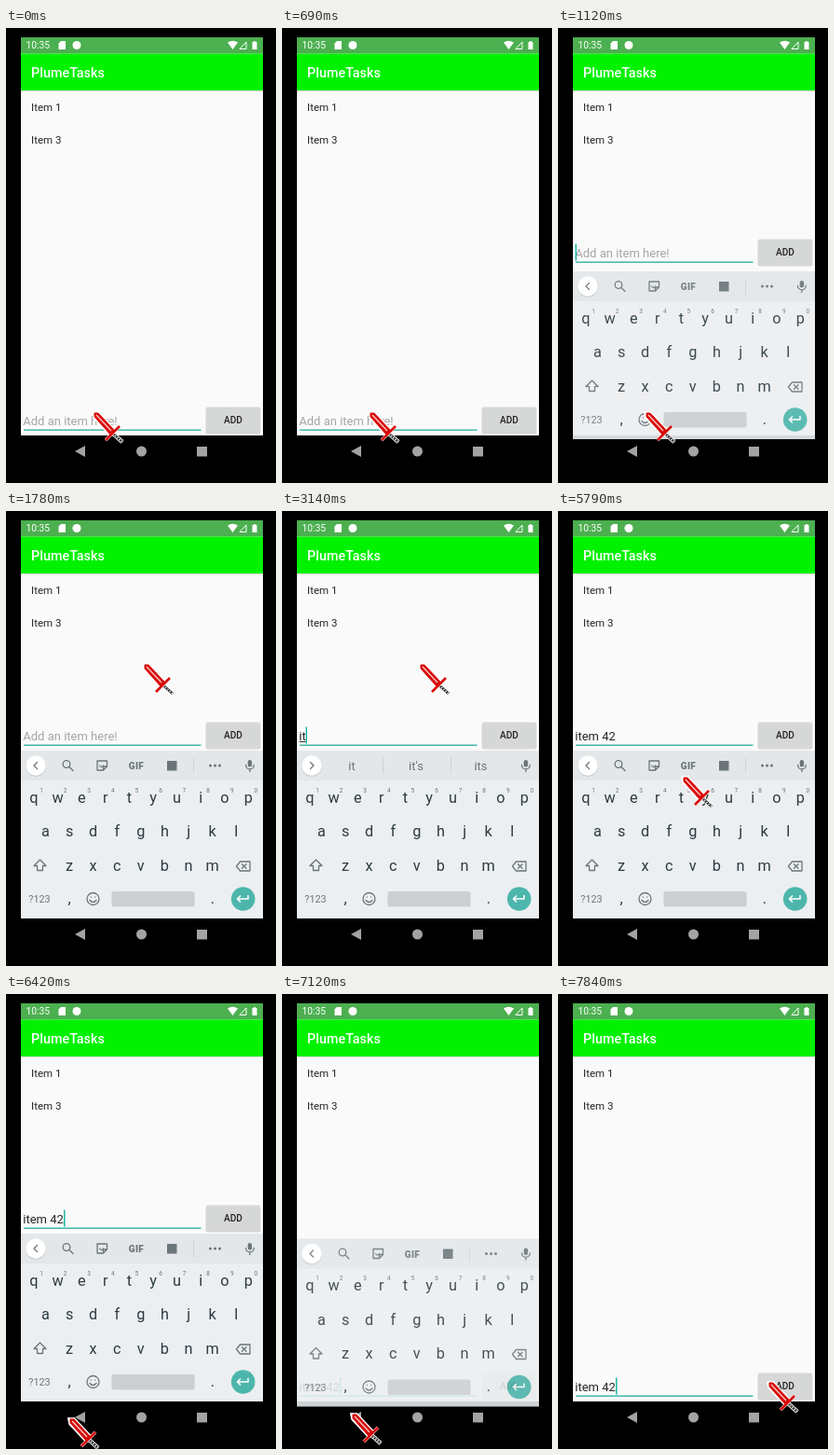
An HTML page that plays this animation: 290 px wide and 488 px high, repeating every 8000 ms.

```html
<!DOCTYPE html>
<html lang="en">
<head>
<meta charset="utf-8">
<title>To-do list</title>
<style>
  html, body { margin: 0; width: 100%; height: 100%; overflow: hidden; background: #000; }
  svg { display: block; width: 290px; height: 488px; font-family: Roboto, sans-serif; }
  .mid { text-anchor: middle; }
  .icon { fill: none; stroke: #6b757a; stroke-width: 1.3; stroke-linejoin: round; stroke-linecap: round; }
  .solid { fill: #6b757a; }
</style>
</head>
<body>
<svg viewBox="0 0 290 488">
  <rect width="290" height="488"/>
  <rect x="16" y="10" width="260" height="427" fill="#fafafa"/>

  <!-- status and app bars -->
  <rect x="16" y="67" width="260" height="1" fill="#ddd"/>
  <rect x="16" y="10" width="260" height="17.5" fill="#4caf50"/>
  <rect x="16" y="27.5" width="260" height="39.5" fill="#00f200"/>
  <g fill="#fff">
    <text x="21.5" y="22" font-size="10.3">10:35</text>
    <path d="M59 14h5v9h-7.5v-6.5z"/>
    <circle cx="76" cy="18.5" r="4.5"/>
    <path d="M238 15.5q5.5-3.5 11 0l-5.5 7.5z"/>
    <path d="M251 22.5h7v-7.500z" fill="none" stroke="#fff"/>
    <path d="M264.500 15h1.500v-1h2v1h1.500v8h-5z"/>
    <text x="27" y="53" font-size="14.4" font-weight="500">PlumeTasks</text>
  </g>
  <g fill="#262626" font-size="11.5">
    <text x="27" y="89">Item 1</text>
    <text x="27" y="123.500">Item 3</text>
  </g>

  <!-- navigation bar -->
  <g fill="#a3a3a3">
    <path d="M74 454l11-6v12z"/>
    <circle cx="145.500" cy="454" r="5.500"/>
    <rect x="205" y="449" width="11" height="10.500"/>
  </g>

  <!-- input row -->
  <g id="row">
    <rect x="214.500" y="407.500" width="59" height="28" rx="2" fill="#000" opacity=".14"/>
    <rect x="215" y="406.500" width="58" height="27.500" rx="1.500" fill="#d6d7d7"/>
    <text class="mid" x="244" y="424" font-size="10.100" font-weight="500" fill="#222">ADD</text>
    <rect x="19" y="430.500" width="190.500" height="1.400" fill="#35b3a1"/>
    <text id="text" x="18.300" y="425.500" font-size="13" xml:space="preserve"></text>
    <rect id="under" x="18.500" y="427" height="1" fill="#333"/>
    <rect id="caret" y="411.500" width="1.500" height="18" fill="#1fb5a5"/>
  </g>

  <!-- keyboard -->
  <g id="keyboard">
    <rect x="16" y="257" width="260" height="180" fill="#eceff1"/>
    <rect x="16" y="257" width="260" height="32" fill="#e3e7e9"/>
    <circle cx="32" cy="273.800" r="11" fill="#000" opacity=".12"/>
    <circle cx="32" cy="273" r="10.700" fill="#fff"/>
    <path id="chevron" class="icon"/>
    <g id="tools">
      <g class="icon">
        <circle cx="65" cy="271.500" r="3.800"/><path d="M68 274.500l4 4"/>
        <path d="M98 268h10.500v6l-4 4H98z M104.500 278v-4h4"/>
        <path d="M100.500 273q2 3 4 0"/>
      </g>
      <text class="mid solid" x="140" y="277" font-size="10" font-weight="900" letter-spacing=".4">GIF</text>
      <rect class="solid" x="173" y="268" width="10.500" height="10.500"/>
      <rect x="201" y="265" width="1" height="17" fill="#cfd4d6"/>
      <g class="solid"><circle cx="219.500" cy="273" r="1.500"/><circle cx="224.500" cy="273" r="1.500"/><circle cx="229.500" cy="273" r="1.500"/></g>
    </g>
    <g id="words" class="mid" font-size="13" fill="#6b757a">
      <path d="M108.500 264v18M181.500 264v18" stroke="#cfd4d6"/>
      <text x="75" y="277.500"></text><text x="144" y="277.500"></text><text x="213.500" y="277.500"></text>
    </g>
    <rect class="solid" x="259.700" y="267" width="4.400" height="7.500" rx="2.200"/>
    <path class="icon" d="M257.500 272.500a4.400 4.400 0 0 0 8.800 0M261.900 277v2.500"/>
    <g id="keys" class="mid" font-size="16.300" fill="#2c3a41"></g>
    <g class="icon">
      <path d="M36.500 374l6.500 6.500h-3.500v5h-6v-5H30z"/>
      <path d="M247.500 381l4-5h10.500v10h-10.500z M253.500 378.700l4.600 4.600M258.100 378.700l-4.600 4.600"/>
      <circle cx="93.500" cy="416" r="6.500"/>
      <path d="M90 417.500q3.500 4 7 0M91.300 414v.1M95.700 414v.1"/>
    </g>
    <text class="mid solid" x="36" y="420" font-size="10.800">?123</text>
    <rect x="113.500" y="408" width="89" height="16.500" rx="2" fill="#cbcfd2"/>
    <circle cx="254.700" cy="416" r="12.800" fill="#4db6ac"/>
    <path d="M260 412v4h-11M252 412.500l-3.500 3.500 3.500 3.500" fill="none" stroke="#fff" stroke-width="1.500"/>
  </g>

  <!-- sword pointer -->
  <g id="sword" fill="none">
    <path d="M21 23l10 9" stroke="#fff" stroke-width="4.500"/>
    <path d="M22 24l9 8" stroke="#222" stroke-width="3"/>
    <path d="M23 25l8 7" stroke="#ddd" stroke-width="2" stroke-dasharray="1.500 1.500"/>
    <path d="M0 1h5l17 18-4 5L1 6zM13 30l15-15" stroke="#fff" stroke-width="3.500"/>
    <path d="M1 1h4l17 18-4 5L1 5z" fill="#d80808" stroke="#d80808"/>
    <path d="M3 3l16 17" stroke="#ffd0d0" stroke-width="1.200"/>
    <path d="M13 30l15-15" stroke="#d80808" stroke-width="2.600"/>
  </g>
</svg>
<script>
const $ = id => document.getElementById(id);
const LOOP = 8000;

// Each track lists [start time, ...values]; values hold until the next entry.
const sword = [
  [0, 94, 412], [150, 94, 413], [420, 94, 412], [1360, 120, 330], [1480, 141, 222],
  [1630, 148, 164], [5790, 134, 285], [5910, 105, 390], [6030, 83, 437], [6180, 80, 450],
  [6300, 72, 455], [6420, 68, 455], [6700, 74, 453], [6850, 76, 452], [6970, 75, 450],
  [7420, 190, 416], [7570, 215, 416], [7690, 226, 416]
];
const typed = [
  [0, "", 18.5], [3020, "i", 21.5], [3140, "it", 25.5], [3420, "ite", 32.5], [3730, "item", 44],
  [3880, "item ", 47.3], [4430, "item 4", 54.5], [4950, "item 42", 62]
];
const words = [
  [0, ""], [3020, "i,I,it"], [3140, "it,it's,its"], [3420, "ite,item,items"],
  [4000, "I,is,and"], [4550, ""]
];
const keyboard = [[0, 0, 0], [1120, 4, .91], [1240, 0, 1], [7120, 5.5, .88], [7270, 0, 0]];
const row = [[0, 0], [970, -180], [7120, 0]];
const caretFlips = [150, 690, 1120, 1780, 2340, 2900, 3020, 5510, 6180, 6850, 7120, 7420, 7840];

const at = (track, t) => track.findLast(k => k[0] <= t).slice(1);
const move = (id, x, y) => $(id).setAttribute("transform", `translate(${x} ${y})`);
const show = (id, on) => $(id).setAttribute("opacity", +on);

function keyRow(letters, x, y) {
  return [...letters].map((c, i) => `<text x="${x + i * 25.6}" y="${y}">${c}</text>`).join("");
}
$("keys").innerHTML =
  keyRow("qwertyuiop", 30, 312.5) + keyRow("asdfghjkl", 42.5, 349) + keyRow("zxcvbnm", 68, 385.5) +
  keyRow(",", 68, 420.5) + keyRow(".", 222, 420.5) +
  `<g font-size="6.5" fill="#6b757a">${keyRow("1234567890", 38, 301.5)}</g>`;

function draw(t) {
  move("sword", ...at(sword, t));
  move("row", 0, at(row, t)[0]);

  const [drop, alpha] = at(keyboard, t);
  move("keyboard", 0, drop);
  show("keyboard", alpha);

  const [text, caretX] = at(typed, t);
  $("text").textContent = text || "Add an item here!";
  $("text").setAttribute("fill", text ? "#262626" : "#a6a6a6");
  $("caret").setAttribute("x", caretX);
  show("caret", caretFlips.filter(f => f <= t).length % 2);
  $("under").setAttribute("width", caretX - 18.5);
  show("under", t < 3880);

  const [list] = at(words, t);
  show("tools", !list);
  show("words", !!list);
  $("words").querySelectorAll("text").forEach((el, i) => el.textContent = list.split(",")[i] || "");
  $("chevron").setAttribute("d", list ? "M30.500 269.500l3.500 3.500-3.500 3.500" : "M33.500 269.500l-3.500 3.500 3.500 3.500");
}

function tick() {
  draw(performance.now() % LOOP);
  requestAnimationFrame(tick);
}
tick();
</script>
</body>
</html>
```
